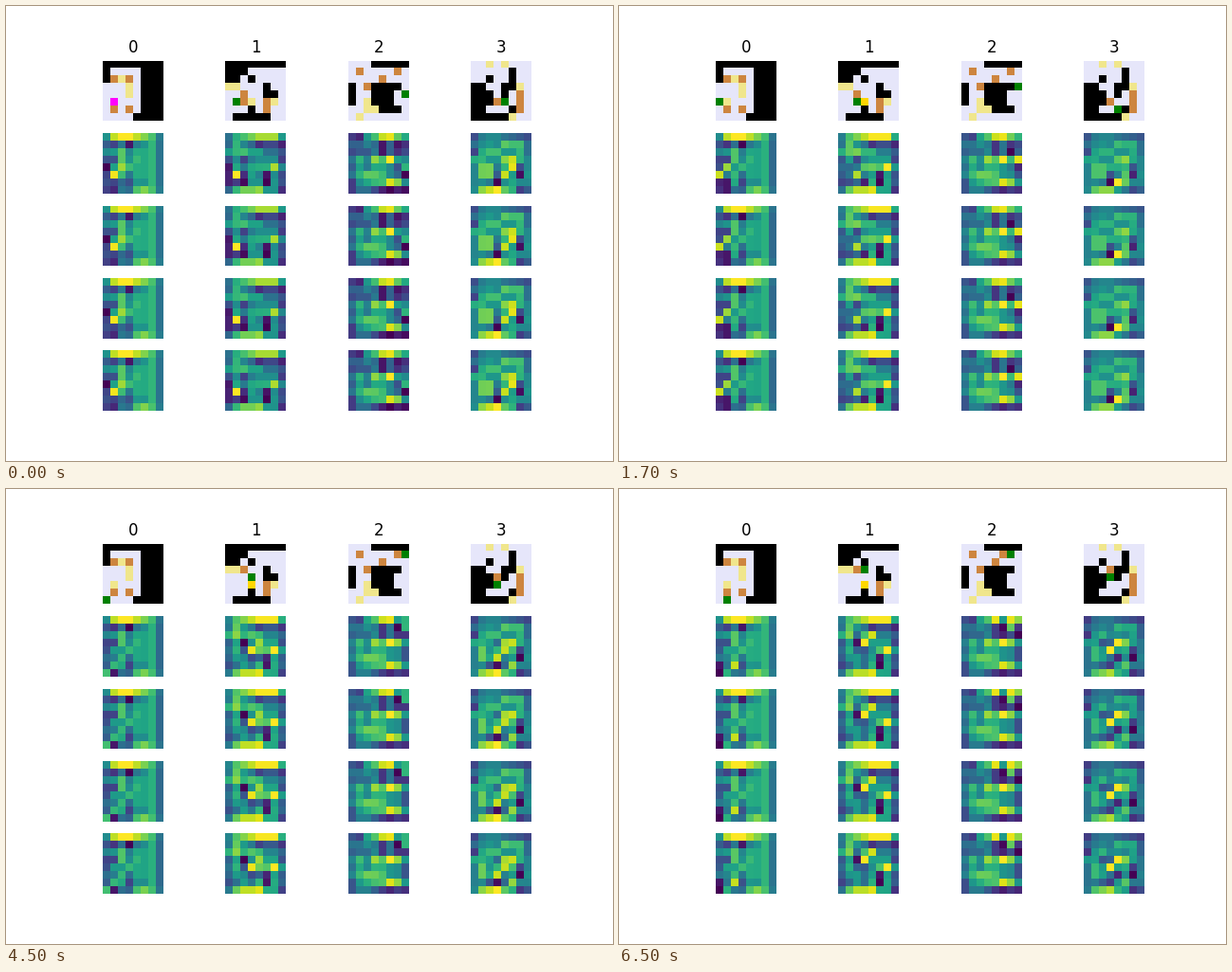
Recreate the animation shown at these times as a matplotlib script. Size 640 by 480 pixels, loop 8 s.

```python
import matplotlib.pyplot as plt
import numpy as np
from matplotlib.animation import FuncAnimation
from matplotlib.colors import to_rgb

SIZE = 8
MOVES = {"U": (-1, 0), "D": (1, 0), "L": (0, -1), "R": (0, 1)}
at = np.s_


def mask(*areas):
    grid = np.zeros((SIZE, SIZE), bool)
    for area in areas:
        grid[area] = True
    return grid


LEVELS = [
    dict(walls=mask(at[0], at[1:3, 0], at[1:, 5:], at[7, 4]),
         boxes=mask(at[2, 1:4:2], at[6, 1:4:2]),
         goals=mask(at[2, 2], at[3:5, 3], at[5, 1]),
         start=(5, 1), path="LDDR"),
    dict(walls=mask(at[0], at[1, :3], at[2, :2], at[2, 3], at[3:5, 5],
                    at[4, 6], at[6, 3], at[7, 1:6]),
         boxes=mask(at[4:6, 2], at[5:7, 5]),
         goals=mask(at[3, :2], at[5, 3:7:3]),
         start=(5, 1), path="RURU"),
    dict(walls=mask(at[0, 3:], at[3:6, 0], at[3, 3:7], at[4:6, 3:6],
                    at[6, 4:7]),
         boxes=mask(at[1, 1:7:5], at[2, 4], at[3, 2]),
         goals=mask(at[5:7, 2], at[6, 3], at[7, 1]),
         start=(4, 7), path="UUUL"),
    dict(walls=mask(at[1:3, 5], at[2, 2], at[3:, :2], at[4:6, 2],
                    at[3, 4:6], at[4, 4], at[6, 5], at[7, 2:5]),
         boxes=mask(at[5, 3], at[4:7, 6]),
         goals=mask(at[0, 2:5:2], at[3, 6], at[7, 5]),
         start=(5, 4), path="DLUU"),
]


# Influence on a cell of something dy rows below it and dx columns right of it.
def wall_weight(dy, dx):
    return 0.25 - 0.35 * abs(dy)


def box_weight(dy, dx):
    return 0.24 * abs(dx) - 0.18


def goal_weight(dy, dx):
    return 0.12 - 0.06 * (abs(dy) + abs(dx))


def agent_weight(dy, dx):
    peak = 0.65 if dy == dx == 0 else 0
    return peak - 0.1 - 0.2 * dy * dx + 0.1 * (dy - dx)


def border_weight(dy, dx):
    return -0.08


def influence(layer, weight, outside=0):
    padded = np.pad(layer.astype(float), 1, constant_values=outside)
    return sum(weight(dy, dx) * padded[1 + dy:1 + dy + SIZE,
                                       1 + dx:1 + dx + SIZE]
               for dy in (-1, 0, 1) for dx in (-1, 0, 1))


def play(level, steps):
    """Walk the path, pushing any box that is in the way."""
    agent, boxes = level["start"], level["boxes"].copy()
    for key in level["path"][:steps]:
        dr, dc = MOVES[key]
        agent = (agent[0] + dr, agent[1] + dc)
        if boxes[agent]:
            boxes[agent] = False
            boxes[agent[0] + dr, agent[1] + dc] = True
    return agent, boxes


def draw_board(level, agent, boxes):
    goals = level["goals"]
    board = np.full((SIZE, SIZE, 3), to_rgb("lavender"))
    board[level["walls"]] = to_rgb("black")
    board[goals] = to_rgb("khaki")
    board[boxes] = to_rgb("peru")
    board[boxes & goals] = to_rgb("gold")
    board[agent] = to_rgb("magenta" if goals[agent] else "green")
    return board


def activation(level, agent, boxes):
    return (influence(level["walls"], wall_weight)
            + influence(boxes, box_weight)
            + influence(level["goals"], goal_weight)
            + influence(mask(agent), agent_weight)
            + influence(mask(), border_weight, outside=1))


def scene(level, steps):
    agent, boxes = play(level, steps)
    return draw_board(level, agent, boxes), activation(level, agent, boxes)


SCENES = [[scene(level, steps) for level in LEVELS] for steps in range(5)]

fig, axes = plt.subplots(5, 4, figsize=(6.4, 4.8), dpi=100)
images = []
for col, (board, heat) in enumerate(SCENES[0]):
    axes[0, col].set_title(str(col))
    images.append([ax.imshow(heat if row else board)
                   for row, ax in enumerate(axes[:, col])])
for ax in axes.flat:
    ax.axis("off")


def update(tick):
    # The first step comes after one tick, the others every four.
    steps = (tick + 3) // 4
    for column, (board, heat) in zip(images, SCENES[steps]):
        column[0].set_data(board)
        for image in column[1:]:
            image.set_data(heat)
            image.set_clim(heat.min(), heat.max())
    return [image for column in images for image in column]


anim = FuncAnimation(fig, update, frames=16, interval=500, repeat=True,
                     repeat_delay=0)
plt.show()
```
